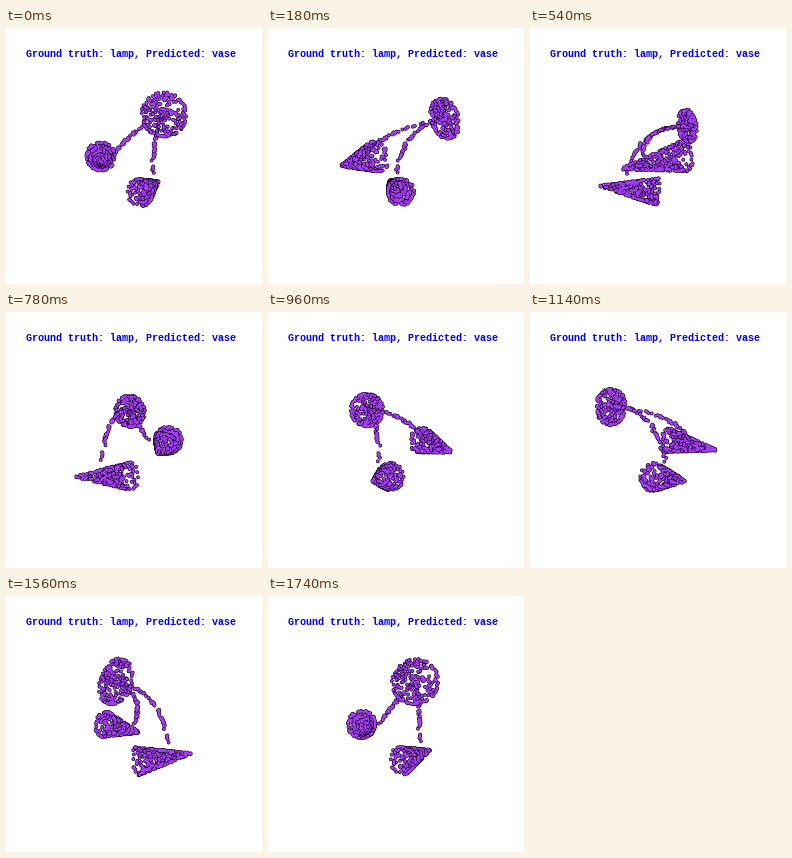
These frames come from a looping animation (256x256 px, 1.8 s). A matplotlib script:

```python
import numpy as np
import matplotlib.pyplot as plt
from matplotlib.animation import FuncAnimation

SIZE, DPI = 256, 72
FRAMES, INTERVAL = 30, 60
CAMERA = 247           # camera distance from the turning axis
LAYER = 9              # points closer in depth than this merge without outline
CORE, OUTLINE = 2.6, 3.8
PURPLE, DARK = (0.65, 0.24, 0.97), (0.06, 0.0, 0.1)

rng = np.random.default_rng(7)


def unit(v):
    return v / np.linalg.norm(v)


def basis(axis):
    """Two unit vectors across the axis."""
    u = unit(np.cross(axis, (0, 1, 0)))
    return u, unit(np.cross(axis, u))


def around(axis, angle, radius):
    u, v = basis(axis)
    return (radius * np.cos(angle))[:, None] * u + (radius * np.sin(angle))[:, None] * v


def cone(base, apex, radius, n):
    base, apex = np.array(base, float), np.array(apex, float)
    t = np.sqrt(rng.random(n))
    ring = around(apex - base, rng.uniform(0, 2 * np.pi, n), radius * t)
    return apex + t[:, None] * (base - apex) + ring


def plate(center, normal, radius, depth, n):
    normal = unit(np.array(normal, float))
    r = radius * np.sqrt(rng.random(n))
    side = depth * rng.choice([-0.5, 0.5], n)
    rim = rng.random(n) < 0.28
    r[rim] = radius
    side[rim] = depth * rng.uniform(-0.5, 0.5, rim.sum())
    ring = around(normal, rng.uniform(0, 2 * np.pi, n), r)
    return np.array(center) + ring + side[:, None] * normal


def arm(start, bend, end, n):
    t = rng.random(n)[:, None]
    start, bend, end = map(np.array, (start, bend, end))
    curve = (1 - t) ** 2 * start + 2 * t * (1 - t) * bend + t ** 2 * end
    return curve + rng.normal(0, 0.6, (n, 3))


# Model space: x right, y down, z towards the viewer
HUB = (24.75, -34.3, 43.0)
lamp = np.vstack([
    plate(HUB, (0.06, -0.165, 0.98), 18.6, 4.5, 210),
    cone((-31, 0, 15), (-40, 10.7, -46), 13.8, 320),
    cone((5, 36.5, 2), (30.5, 31, -57), 13.8, 320),
    arm(HUB, (-0.4, -29.0, -16.5), (-24.0, 0.0, -22.0), 50),
    arm(HUB, (21.8, -33.0, -14.0), (21.0, 19.5, -28.0), 60),
])


def project(angle):
    x, y, z = lamp.T
    c, s = np.cos(angle), np.sin(angle)
    depth = z * c - x * s
    scale = CAMERA / (CAMERA - depth)
    xy = SIZE / 2 + np.column_stack([(x * c + z * s) * scale, y * scale])
    return xy, depth


fig = plt.figure(figsize=(SIZE / DPI, SIZE / DPI), dpi=DPI, facecolor="white")
ax = fig.add_axes([0, 0, 1, 1])
ax.set_xlim(0, SIZE)
ax.set_ylim(SIZE, 0)
ax.axis("off")
ax.text(19.5, 29, "Ground truth: lamp, Predicted: vase", color="#0000ff",
        family="Liberation Mono", weight="bold", size=10, va="baseline")

count = len(lamp)
is_core = np.repeat([0, 1], count)
colors = np.array([DARK, PURPLE])[is_core]
sizes = np.array([OUTLINE, CORE])[is_core] ** 2
dots = ax.scatter(np.zeros(2 * count), np.zeros(2 * count), s=sizes, linewidths=0)


def update(frame):
    xy, depth = project(2 * np.pi * frame / FRAMES)
    layer = np.tile(np.floor(depth / LAYER), 2)
    order = np.lexsort((is_core, layer))  # far to near, outlines before cores
    dots.set_offsets(np.tile(xy, (2, 1))[order])
    dots.set_facecolors(colors[order])
    dots.set_sizes(sizes[order], DPI)
    return dots,


anim = FuncAnimation(fig, update, frames=FRAMES, interval=INTERVAL,
                     repeat=True, repeat_delay=0)
plt.show()
```
